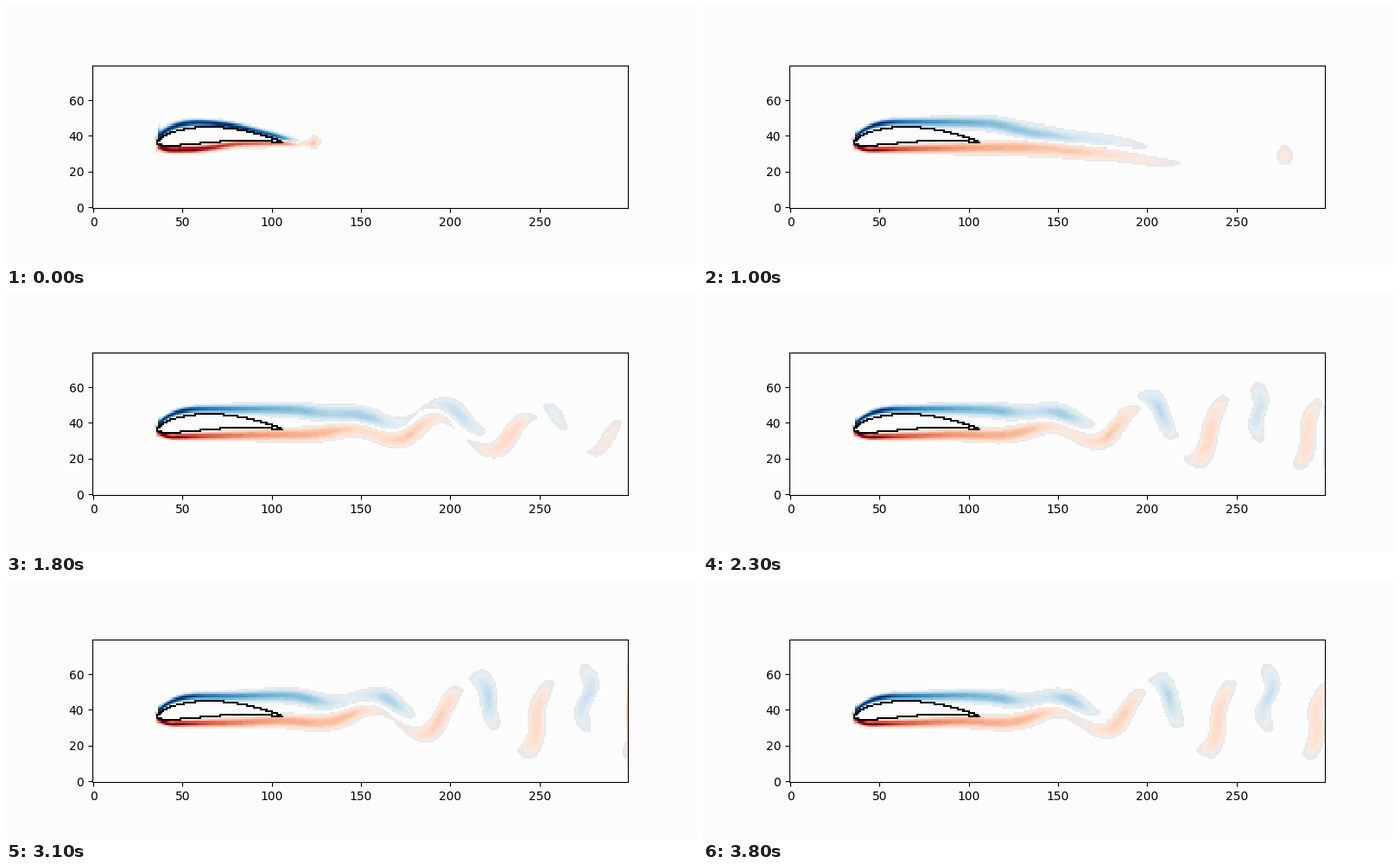
Animation, 800 px wide and 300 px high, one loop 3900 ms. Source, as a matplotlib script:

```python
import numpy as np
import matplotlib.pyplot as plt
from matplotlib.animation import FuncAnimation
from matplotlib.colors import ListedColormap

W, H = 300, 80
FRAMES, INTERVAL = 39, 100
WAVE = 55           # wavelength of the vortex street, in cells
FREQ = 0.406        # shedding cycles per frame
NOSE, CHORD = 36, 70
PAPER = "#fcfcfc"

xs = np.arange(W, dtype=float)
ys = np.arange(H, dtype=float)
X, Y = np.meshgrid(xs, ys)
run = np.maximum(xs - NOSE + 2, 1)    # distance along the boundary layer


def wing_surface(side, camber=0.064, thick=0.132, base=36.1):
    """Four-digit style section with its camber peak at half chord."""
    s = np.linspace(0, 1, 3000) ** 2
    mid = 4 * camber * s * (1 - s)
    half = 5 * thick * (0.2969 * np.sqrt(s) - 0.126 * s - 0.3516 * s ** 2
                        + 0.2843 * s ** 3 - 0.1015 * s ** 4)
    return NOSE + CHORD * s, base + CHORD * (mid + side * half)


wing = np.zeros((H, W), bool)
inside = (X > NOSE) & (X < NOSE + CHORD)
for side in (1, -1):
    px, py = wing_surface(side)
    wing[np.rint(py).astype(int), np.rint(px).astype(int)] = True
    inside &= side * (np.interp(X, px, py) - Y) > 0


def smooth(v):
    v = np.clip(v, 0, 1)
    return v * v * (3 - 2 * v)


def quarter(u):
    """Quarter ellipse rising from 0 to 1."""
    return np.sqrt(1 - (1 - np.clip(u, 0, 1)) ** 2)


def settle(t):
    return np.exp(-t / 2)


def cycles(x, t):
    """Phase of the street in cycles; whole numbers are crests."""
    return (x - 200) / WAVE - FREQ * (t - 38)


def growth(t):
    return 1 / (1 + np.exp(-(t - 18.3) / 2.4))


def sag(t, start):
    """The young wake slopes down behind the wing, then levels out."""
    return 0.28 * np.exp(-(t / 11) ** 2) * 8 * np.logaddexp(0, (xs - start) / 8)


def upper_mean(t):
    line = 36.2 + 11.2 * quarter((xs - 36) / 24) - 3 * smooth((xs - 110) / 30)
    return line - sag(t, min(75 + 6 * t, 110))


def lower_mean(t):
    line = 37 - 5 * quarter((xs - 35) / 10) + 0.02 * np.clip(xs - 45, 0, 75)
    line += 2.5 * smooth((xs - 115) / 40)
    return line + 2.5 * settle(t) * smooth((xs - 55) / 30) - sag(t, 125)


def layer(t, mean, strength, boost, end, core, sway, eye, swirl, focus):
    """One shear layer that waves and rolls up into vortices downstream."""
    g, c = growth(t), settle(t)
    amp = 21 * sway * g / (1 + np.exp(-(xs - 152 - 33 * g) / (6 + 16 * g)))

    # Each vortex turns its own part of the wave
    dy = Y - eye
    turn = swirl * g * smooth((xs - 190) / 80) * dy * np.exp(-(dy / 14) ** 2)
    theta = 2 * np.pi * cycles(X - turn, t)
    gap = Y - mean - amp * np.cos(theta)
    dist = gap / np.maximum(np.hypot(*np.gradient(gap)), 1)

    kappa = focus * g * np.maximum(xs - 120, 0) / 73
    weight = np.exp(kappa * (np.cos(theta - 2 * np.pi * core) - 1))
    width = 1.6 * c + (1 - c) * np.minimum(0.94 + 0.03 * run, 4)
    width = width * (1 + 0.35 * g * smooth((xs - 160) / 60) * weight)

    level = np.minimum(strength * (1 + boost * c) * run ** -0.6, 1.05)
    level *= np.clip((end - xs) / (18 + 6 * t), 0, 1) * np.clip((xs - 34) / 2, 0, 1)
    return level * weight * np.exp(-(dist / width) ** 2)


def blob(x, y, rx, ry, level):
    return level * np.exp(-((X - x) / rx) ** 2 - ((Y - y) / ry) ** 2)


def vorticity(t):
    upper = layer(t, upper_mean(t), strength=6, boost=0.7,
                  end=121 + 7.5 * t + 0.2 * t * t,
                  core=0.22, sway=0.8, eye=46, swirl=0.9, focus=1.9)
    lower = layer(t, lower_mean(t), strength=5, boost=0.3,
                  end=128 + 8 * t + 0.28 * t * t,
                  core=-0.28, sway=1, eye=32, swirl=-0.4, focus=1.1)
    field = lower - upper

    # Starting vortex and the scrap of wake that trails it
    r = min(2.6 + 0.4 * t, 5)
    field += blob(124 + 15.3 * t, 36.8 - 0.8 * t, r, 1.2 * r, 0.22 * np.exp(-t / 15))
    field += blob(194 + 13 * (t - 6), 22.3, 7, 2.8, 0.085 * max(0, 1 - abs(t - 6) / 4))
    field[inside] *= 0.25 * np.exp(-t)

    # The flow wraps around, which leaves a trace on the outer columns
    edge = 0.2 * smooth((t - 16) / 7) * np.cos(2 * np.pi * (cycles(W - 1, t) - 0.05))
    field[:, -1] -= edge * np.exp(-((ys - 38) / 25) ** 2)
    field[:, 0] += 0.6 * edge * np.exp(-((ys - 31) / 12) ** 2)
    return field


def flow_colors(n=61):
    """Red and blue scale whose faintest steps fall back to paper and grey."""
    colors = plt.get_cmap("RdBu_r")(np.linspace(0, 1, n))
    mid = n // 2
    colors[mid - 1:mid + 2, :3] = 252 / 255
    colors[mid - 2, :3] = 0.905, 0.912, 0.917
    colors[mid + 2, :3] = 0.925, 0.913, 0.907
    return ListedColormap(colors)


fig, ax = plt.subplots(figsize=(8, 3), dpi=100, facecolor=PAPER)
ax.set_facecolor(PAPER)
flow = ax.imshow(vorticity(0), origin="lower", cmap=flow_colors(),
                 vmin=-1, vmax=1, interpolation="nearest")
ax.imshow(np.ma.masked_where(~wing, wing), origin="lower",
          cmap=ListedColormap(["black"]), interpolation="nearest")
ax.set_xticks(range(0, 251, 50))
ax.set_yticks(range(0, 61, 20))


def draw(i):
    flow.set_data(vorticity(i))
    return [flow]


anim = FuncAnimation(fig, draw, frames=FRAMES, interval=INTERVAL, repeat=True)
plt.show()
```
